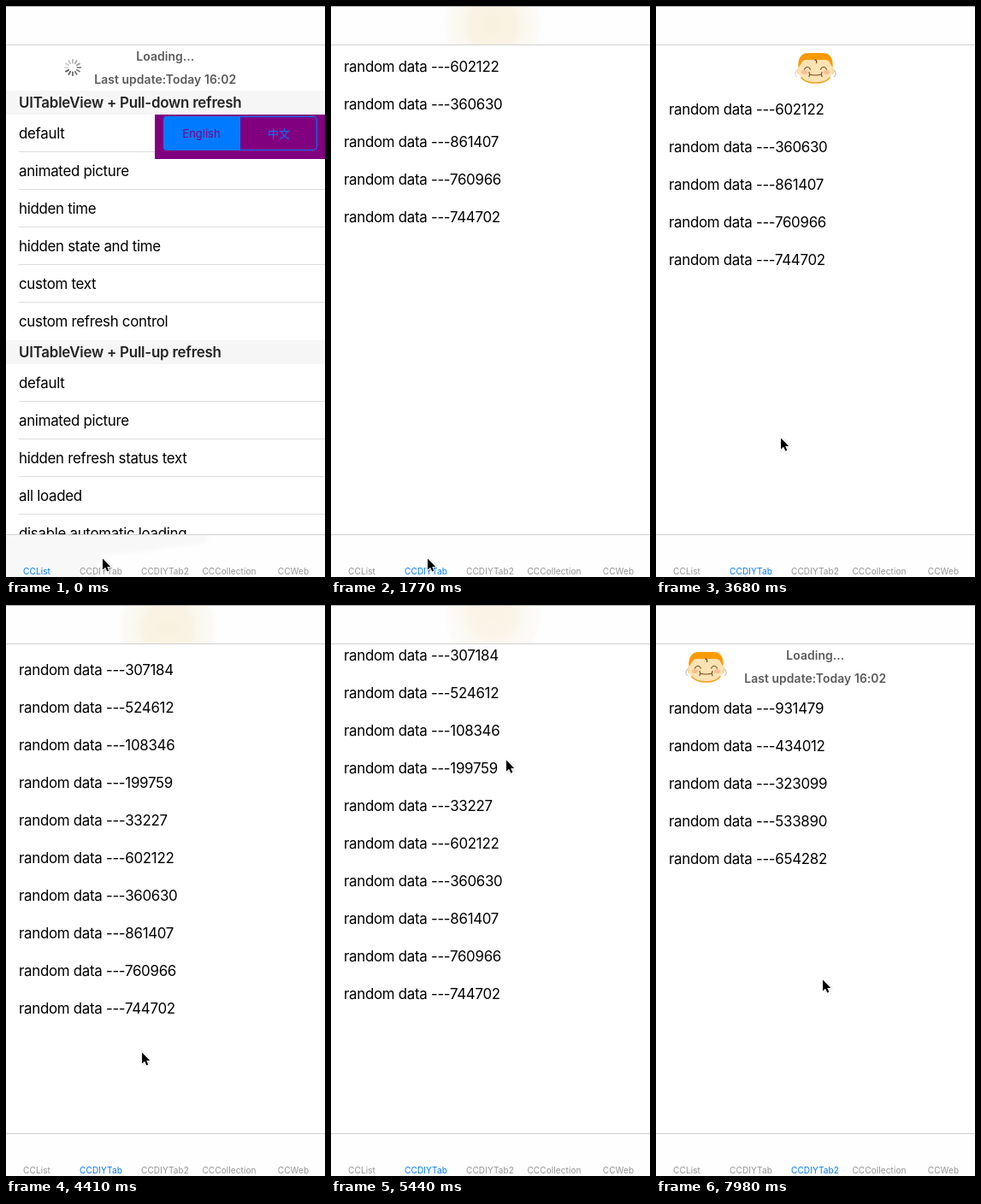
Recreate the animation shown at these times as an HTML page. Size 373 by 668 pixels, loop 8000 ms.

```html
<!DOCTYPE html>
<html lang="en">
<head>
<meta charset="utf-8">
<title>Pull to refresh</title>
<style>
  html, body { margin: 0; width: 100%; height: 100%; overflow: hidden; background: #fff; }
  svg { display: block; width: 100%; height: 100%; font-family: Inter, "Noto Sans CJK SC", "Noto Sans CJK", sans-serif; }
  .row { font-size: 16.9px; letter-spacing: -.3px; fill: #000; }
  .section { font-size: 16.9px; font-weight: 600; letter-spacing: -.22px; fill: #232323; }
  .status { font-size: 13.9px; font-weight: 600; letter-spacing: .08px; fill: #5a5a5a; text-anchor: middle; }
  .segment { font-size: 13px; text-anchor: middle; }
  .tab { font-size: 10px; letter-spacing: .1px; text-anchor: middle; }
</style>
</head>
<body>
<svg id="stage" viewBox="0 0 373 668">
  <defs>
    <radialGradient id="warm">
      <stop offset="0" stop-color="#f9f0de"/>
      <stop offset=".5" stop-color="#faf3e5"/>
      <stop offset=".6" stop-color="#fbf7ee"/>
      <stop offset=".93" stop-color="#fcfaf6"/>
      <stop offset="1" stop-color="#fdfcfa" stop-opacity=".4"/>
    </radialGradient>
    <radialGradient id="cool">
      <stop offset="0" stop-color="#f5f5f5"/>
      <stop offset=".7" stop-color="#f8f8f8"/>
      <stop offset="1" stop-color="#fbfbfb" stop-opacity=".3"/>
    </radialGradient>
    <filter id="soft" x="-20%" y="-40%" width="140%" height="180%"><feGaussianBlur stdDeviation="2"/></filter>
    <clipPath id="body"><path d="M0 45H373V619H0Z"/></clipPath>
    <clipPath id="bar"><path d="M0 1H373V45H0Z"/></clipPath>
    <clipPath id="dock"><path d="M0 619H373V668H0Z"/></clipPath>
    <g id="face">
      <ellipse cx="-19.5" cy="4" rx="2.5" ry="4" fill="#fbd79a"/>
      <ellipse cx="19.5" cy="4" rx="2.5" ry="4" fill="#fbd79a"/>
      <path d="M-20 2C-21 -10 -16 -17 -7 -17H8C16 -17 21 -10 20 2C20 13 12 18 0 18S-20 13 -20 2Z" fill="#fde3b4"/>
      <path d="M-17 11.500C-13 16.500 -7 18 0 18S13 16.500 17 11.500" fill="none" stroke="#f0a224" stroke-width="1.600"/>
      <path d="M-20 0C-21 -11 -17 -17 -8 -17H9C17 -17 21 -11 20 0L17 -5C16 -8 14 -9 11 -9H-10C-14 -9 -16 -7 -17 -4Z" fill="#f99a07"/>
      <path d="M-1 -9Q2 -9 1 -5" fill="none" stroke="#7b4719" stroke-width="1.300"/>
      <ellipse cx="-13" cy="5.500" rx="3.500" ry="2.500" fill="#f9bd93"/>
      <ellipse cx="13" cy="5.500" rx="3.500" ry="2.500" fill="#f9bd93"/>
      <path d="M-13 2Q-9.500 -3.500 -6 2M6 2Q9.500 -3.500 13 2M-7 8Q0 10 7 8M-7.500 5.500Q-6 8 -7.500 10.500M7.500 5.500Q6 8 7.500 10.500" fill="none" stroke="#7b4719" stroke-width="1.200" stroke-linecap="round"/>
    </g>
  </defs>
  <rect width="373" height="668" fill="#fff"/>
  <g id="screens" clip-path="url(#body)"></g>
  <rect width="373" height="45" fill="#fefefe"/>
  <g id="glow" clip-path="url(#bar)">
    <ellipse id="textGlow" cx="176" rx="56" ry="46" fill="url(#cool)"/>
    <ellipse id="faceGlow" rx="57" ry="60" fill="url(#warm)"/>
  </g>
  <path d="M0 .5H373" stroke="#b0b0b0"/>
  <path d="M0 45.500H373" stroke="#d0d0d0"/>
  <rect y="619" width="373" height="49" fill="#fefefe"/>
  <g clip-path="url(#dock)">
    <path id="dockGlow" d="M-9 610H235V628L195 633L160 639L112 641L104 672H-9Z" fill="#f8f8f8" filter="url(#soft)"/>
  </g>
  <path d="M0 618.500H373" stroke="#d0d0d0"/>
  <g id="tabs"></g>
  <g id="cursor">
    <path d="M1 1V14.500L4 11.800L6.500 16.800L8.500 15.800L6.500 11H10.500Z" fill="#000" opacity=".22" filter="url(#soft)"/>
    <path d="M0 .5V13.500L3.100 10.700L5.300 15.600L7.300 14.700L5.200 10H9.300Z" stroke="#fff" stroke-width="1.800" paint-order="stroke"/>
  </g>
</svg>
<script>
const LOOP = 8000, PULL = 54, ROW = 44, TOP = 45, BLUE = '#007aff';
const SHOW_TAB2 = 1697, END_TAB2 = 4109, SHOW_TAB3 = 6180, END_LIST = 1080;
const byId = id => document.getElementById(id);
const clamp = v => Math.max(0, Math.min(1, v));

function add(parent, tag, attrs = {}, text) {
  const el = document.createElementNS('http://www.w3.org/2000/svg', tag);
  for (const name in attrs) el.setAttribute(name, attrs[name]);
  if (text) el.textContent = text;
  parent.appendChild(el);
  return el;
}
const label = (parent, cls, x, y, text, fill) =>
  add(parent, 'text', fill ? { class: cls, x, y, fill } : { class: cls, x, y }, text);
const show = (el, on) => el.setAttribute('display', on ? 'inline' : 'none');
const move = (el, x, y) => el.setAttribute('transform', `translate(${x} ${y})`);

function statusText(parent) {
  label(parent, 'status', 186.3, 9.5, 'Loading...');
  label(parent, 'status', 186.3, 36.5, 'Last update:Today 16:02');
}

function addFace(parent, x) {
  const g = add(parent, 'g', { transform: `translate(${x} 18)` });
  const head = add(g, 'use', { href: '#face' });
  const arcs = [-1, 1].map(s => add(g, 'path', {
    d: `M${s * 22} 3Q${s * 25.5} 8 ${s * 21.5} 11`, fill: 'none', stroke: '#b9b0a6'
  }));
  return { head, arcs };
}

function addRows(parent, numbers) {
  const g = add(parent, 'g');
  numbers.forEach((n, i) => label(g, 'row', 15, TOP + i * ROW + 27.7, 'random data ---' + n));
  return g;
}

function addSection(parent, y, title, rows) {
  add(parent, 'rect', { y, width: 373, height: 28, fill: '#f6f6f6' });
  label(parent, 'section', 15, y + 20.3, title);
  y += 28;
  rows.forEach((text, i) => {
    label(parent, 'row', 15, y + 27.7, text);
    y += ROW;
    if (i < rows.length - 1) add(parent, 'path', { d: `M15 ${y - .5}H373`, stroke: '#dddde0' });
  });
  return y;
}

function addSwitch(parent) {
  const g = add(parent, 'g', { transform: 'translate(174 73)' });
  add(g, 'rect', { width: 199, height: 52, fill: '#800080' });
  add(g, 'path', { d: 'M100 2H14Q10 2 10 6V38Q10 42 14 42H100Z', fill: BLUE });
  add(g, 'rect', { x: 10.5, y: 2.5, width: 179, height: 39, rx: 4, fill: 'none', stroke: BLUE });
  label(g, 'segment', 54.5, 26.7, 'English', '#800080');
  label(g, 'segment', 145, 26.7, '中文', BLUE);
}

const screens = [0, 1, 2].map(() => add(byId('screens'), 'g'));

// first tab: sectioned list
const spinner = add(screens[0], 'g', { transform: 'translate(78 18)' });
const spokes = Array.from({ length: 12 }, (_, i) => add(spinner, 'path', {
  d: 'M0 -5.500V-9.300', stroke: '#555', 'stroke-width': 1.8, 'stroke-linecap': 'round',
  transform: `rotate(${i * 30})`
}));
statusText(screens[0]);
const nextY = addSection(screens[0], TOP, 'UITableView + Pull-down refresh',
  ['default', 'animated picture', 'hidden time', 'hidden state and time', 'custom text', 'custom refresh control']);
addSection(screens[0], nextY, 'UITableView + Pull-up refresh',
  ['default', 'animated picture', 'hidden refresh status text', 'all loaded', 'disable automatic loading', 'custom text', '']);
addSwitch(screens[0]);

// second and third tabs: random rows
const oldData = [602122, 360630, 861407, 760966, 744702];
const newData = [307184, 524612, 108346, 199759, 33227];
const before = addRows(screens[1], oldData);
const after = addRows(screens[1], [...newData, ...oldData]);
addRows(screens[2], [931479, 434012, 323099, 533890, 654282]);
statusText(screens[2]);
const faces = [addFace(screens[1], 186.5), addFace(screens[2], 58.5)];

const tabs = ['CCList', 'CCDIYTab', 'CCDIYTab2', 'CCCollection', 'CCWeb']
  .map((name, i) => label(byId('tabs'), 'tab', 36 + 75 * i, 664.5, name));

const path = [
  [0, 113, 646], [1763, 113, 646], [2350, 133, 545], [2800, 141, 518], [3672, 146, 505],
  [3966, 152, 512], [4407, 159, 523], [4700, 166, 534], [5000, 211, 300], [5140, 212, 215],
  [5437, 205, 181], [5600, 205, 183], [6030, 188, 600], [6180, 186, 631], [6480, 186, 631],
  [7000, 193, 530], [7370, 195, 438], [LOOP, 195, 438]
];
const drag = [[0, 0], [5000, 0], [5437, -8], [5600, -8], [5900, 0], [LOOP, 0]];

function along(keys, t, col) {
  const i = Math.max(1, keys.findIndex(k => k[0] >= t));
  const a = keys[i - 1], b = keys[i];
  return a[col] + (b[col] - a[col]) * (t - a[0]) / (b[0] - a[0]);
}

function slide(t, start) {
  const p = clamp((t - start) / 400);
  return PULL * p * p * (3 - 2 * p);
}

// the picture advances in steps of about 147 ms
function stepOf(t) {
  const [start, length, first] = t < 5288 ? [0, 146.9, 0] : t < 6328 ? [5288, 148.6, 36] : [6328, 150, 43];
  const n = Math.floor((t - start) / length);
  return { time: start + n * length, count: first + n };
}

function offsetAt(t, tab) {
  if (tab === 0) return PULL - slide(t, END_LIST);
  if (tab === 1) return slide(t, SHOW_TAB2) - slide(t, END_TAB2) + along(drag, t, 1);
  return slide(t, SHOW_TAB3);
}

function draw(now) {
  const { time, count } = stepOf(now % LOOP);
  const tab = time < SHOW_TAB2 ? 0 : time < SHOW_TAB3 ? 1 : 2;
  const off = Math.round(offsetAt(time, tab));

  screens.forEach((s, i) => { show(s, i === tab); move(s, 0, off); });
  show(before, time < END_TAB2);
  show(after, time >= END_TAB2);
  tabs.forEach((el, i) => el.setAttribute('fill', i === tab ? BLUE : '#929292'));

  const lead = Math.floor(time / 1000 * 12) + 8;
  spokes.forEach((s, i) => s.setAttribute('opacity', 1 - .8 * ((lead - i + 24) % 12) / 11));

  const pose = count % 3;
  for (const { head, arcs } of faces) {
    head.setAttribute('transform', pose === 2 ? 'translate(0 .5) scale(1.03 .97)' : 'scale(1)');
    arcs.forEach((a, i) => a.setAttribute('opacity', pose === 2 ? .3 : pose === 1 && i === 0 ? .6 : 1));
  }

  // header seen blurred through the top bar
  const hidden = clamp((44 - off) / 35);
  show(byId('glow'), tab > 0);
  const warm = byId('faceGlow');
  warm.setAttribute('cx', tab === 1 ? 189 : 60);
  warm.setAttribute('cy', 18 + off);
  warm.setAttribute('opacity', hidden * (off < 0 ? .8 : 1));
  const cool = byId('textGlow');
  show(cool, tab === 2);
  cool.setAttribute('cy', 14 + off);
  cool.setAttribute('opacity', hidden);
  show(byId('dockGlow'), tab === 0);

  move(byId('cursor'), along(path, time, 1), along(path, time, 2));
}

const begin = performance.now();
function tick() {
  draw(performance.now() - begin);
  requestAnimationFrame(tick);
}
tick();
</script>
</body>
</html>
```
